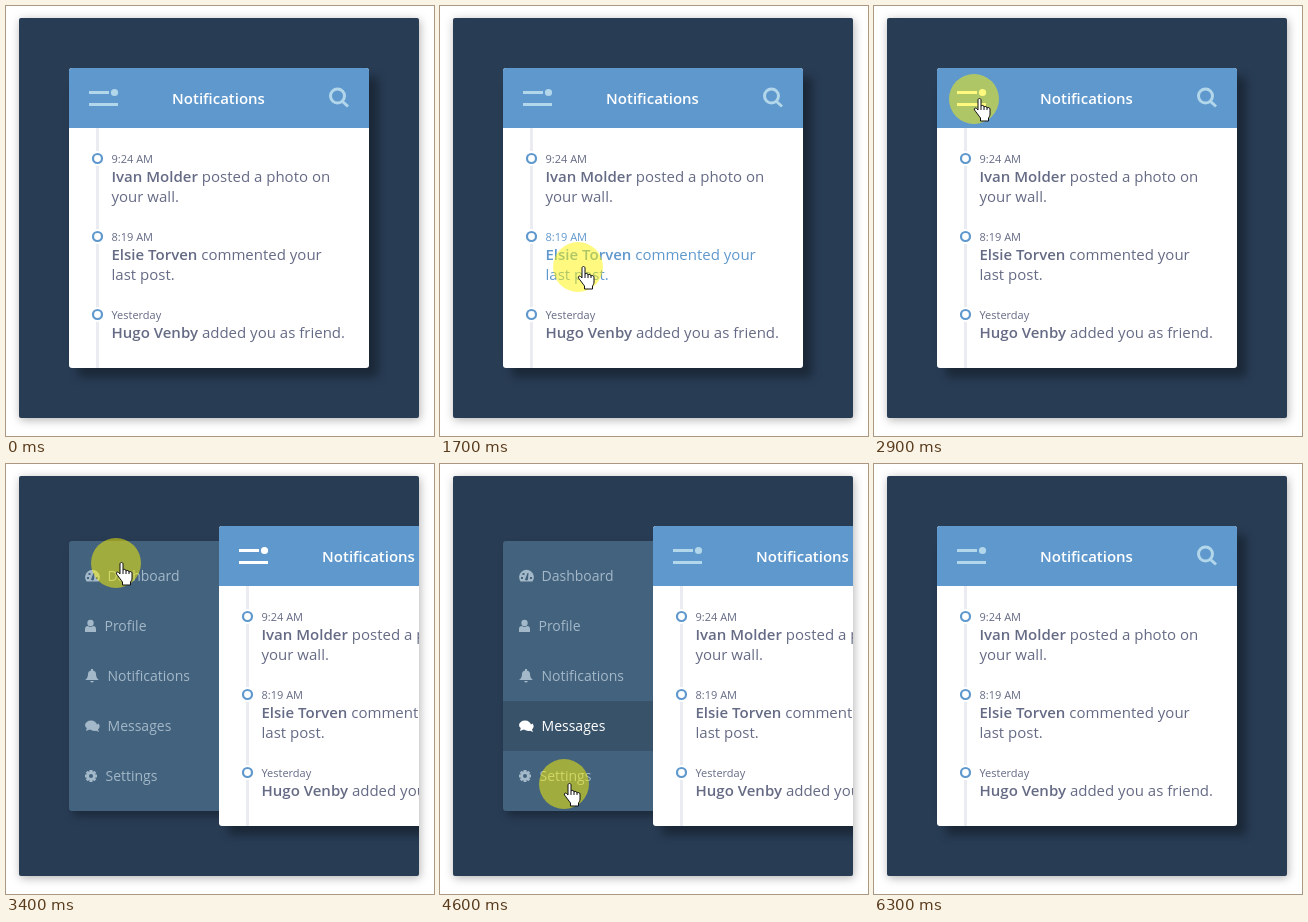
These frames come from a looping animation (428 px wide and 430 px high, 6.6 s). An HTML page:

```html
<!DOCTYPE html>
<html lang="en">
<head>
<meta charset="utf-8">
<title>Notifications</title>
<style>
  html, body { margin: 0; width: 100%; height: 100%; overflow: hidden; background: #fff; }
  svg { display: block; width: 428px; height: 430px; font: 15px "Open Sans", sans-serif; }
  .panel { fill: #283c54; filter: drop-shadow(1px 2px 5px rgba(0, 0, 0, .3)); }
  .sheet { fill: #fff; filter: drop-shadow(9px 9px 5px rgba(0, 0, 0, .35)); }
  .menu { fill: #43627d; filter: drop-shadow(4px 5px 4px rgba(0, 0, 0, .3)); }
  .header { fill: #5f98cd; }
  .title { fill: #fff; font-weight: 600; text-anchor: middle; }
  .toggle, .search { fill: none; stroke: #b2d6ea; stroke-width: 3; }
  .toggle circle { fill: #b2d6ea; stroke: none; }
  .toggle.hover { stroke: #fff; }
  .toggle.hover circle { fill: #fff; }
  .note { fill: #666b85; }
  .note.hover { fill: #5f98cd; }
  .time { font-size: 11px; }
  .name { font-weight: 600; }
  .ring { fill: #fff; stroke: #5f98cd; stroke-width: 2.2; }
  .item { fill: #a3b8c9; font-size: 14px; }
  .item rect { fill: none; }
  .item.hover { fill: #fff; }
  .item.hover rect { fill: #385269; }
  .item .gap { fill: #43627d; }
  .item.hover .gap { fill: #385269; }
  .item .tooth { fill: inherit; }
</style>
</head>
<body>
<svg viewBox="0 0 428 430">
  <clipPath id="stage"><rect x="13" y="12" width="400" height="400" rx="2"/></clipPath>
  <rect class="panel" x="13" y="12" width="400" height="400" rx="2"/>
  <g clip-path="url(#stage)">
    <rect class="menu" x="63" y="77" width="156" height="270" rx="3"/>
    <g id="items"></g>
    <g id="card">
      <rect class="sheet" x="63" y="62" width="300" height="300" rx="3"/>
      <path class="header" d="M63 122V65q0-3 3-3h294q3 0 3 3v57z"/>
      <g class="toggle" id="toggle">
        <path d="M83 86.500h20M83 98.500h29"/>
        <circle cx="108.500" cy="86.500" r="3.600"/>
      </g>
      <text class="title" x="212.500" y="98">Notifications</text>
      <path class="search" d="M336 95l6 5.500M338.500 90a7 7 0 1 1-14 0a7 7 0 1 1 14 0"/>
      <path d="M90 122h3v240h-3z" fill="#ebebf2"/>
      <g id="notes"></g>
    </g>
  </g>
  <g id="cursor">
    <circle r="25" fill="rgba(255,245,0,.5)"/>
    <g transform="translate(0 -1)" stroke="#111" stroke-linejoin="round">
      <path fill="#fff" d="M4 2c0-2 3-2 3 0v6c1-1 3-1 3 1c1-1 3-.7 3 1c1-.8 3-.5 3 1v5c0 2-1 3-1.500 4v3h-8v-3C5 18 2 14 .5 12c-1-1.500 1-2.500 2-1.500L4 12z"/>
      <path fill="none" d="M7 8v4M10 9v3M13 10v2"/>
    </g>
  </g>
</svg>
<script>
const $ = id => document.getElementById(id);

const notes = [
  ['9:24 AM', 'Ivan Molder', 'posted a photo on', 'your wall.'],
  ['8:19 AM', 'Elsie Torven', 'commented your', 'last post.'],
  ['Yesterday', 'Hugo Venby', 'added you as friend.', '']
];
$('notes').innerHTML = notes.map(([time, name, text, more], i) => `
  <g class="note" id="note${i}" transform="translate(0 ${i * 78})">
    <circle cx="91.500" cy="152.500" r="7.500" fill="#fff"/>
    <circle class="ring" cx="91.500" cy="152.500" r="4.500"/>
    <text class="time" x="105.500" y="157">${time}</text>
    <text x="105.500" y="176"><tspan class="name">${name}</tspan> ${text}</text>
    <text x="105.500" y="196">${more}</text>
  </g>`).join('');

// Icons are drawn around the vertical centre of each row, from x = 0.
const gearTeeth = [0, 45, 90, 135].map(angle =>
  `<rect class="tooth" x="4.500" y="-6" width="3" height="12" transform="rotate(${angle} 6 0)"/>`).join('');
const items = [
  ['Dashboard', 101.5, `<path d="M1.500 5.500a7.400 7.400 0 1 1 12 0z"/>
    <path class="gap" d="M6 3.500a1.700 1.700 0 0 0 3 0L9.500-3 8.500-3zM2 1h2v2H2zM3.500-3h2v2h-2zM11 1h2v2h-2z"/>`],
  ['Profile', 98.5, '<circle cx="5.500" cy="-3" r="3.200"/><path d="M0 6V3Q0 0 3 0q2.500 1.800 5 0q3 0 3 3v3z"/>'],
  ['Notifications', 101.5, '<path d="M0 4q3-2 3-6 0-3 3-3.500v-1.500h2v1.500q3 .5 3 3.500 0 4 3 6zM5 5h4q-2 3-4 0z"/>'],
  ['Messages', 101.5, `<path d="M5 3.500q3 2 6 1.200l3 1.300-1-2.500q3-3 .5-6z"/>
    <ellipse cx="6" cy="-1" rx="6" ry="4.400"/><path d="M2 1L1 5l5-2z"/>`],
  ['Settings', 99.5, `<circle cx="6" r="4.700"/>${gearTeeth}<circle class="gap" cx="6" r="2"/>`]
];
$('items').innerHTML = items.map(([label, x, icon], i) => `
  <g class="item" id="item${i}" transform="translate(0 ${i * 50})">
    <rect x="63" y="87" width="152" height="50"/>
    <g transform="translate(79 112)">${icon}</g>
    <text x="${x}" y="117">${label}</text>
  </g>`).join('');

// Pointer stops: time, x, y.
const path = [
  [100, 10, 125], [800, 112, 158], [1400, 134, 234], [1700, 138, 261], [2150, 125, 328],
  [2300, 125, 325], [2800, 100, 93], [3200, 100, 93], [3400, 110, 99], [3600, 115, 118],
  [4600, 124, 320], [4800, 124, 322], [5250, 241, 92], [5500, 241, 92], [6000, 402, 68]
];
// Element under the pointer from each time on.
const hovers = [
  [0, ''], [700, 'note0'], [1450, 'note1'], [1950, 'note2'], [2400, 'note1'], [2550, 'note0'],
  [2700, 'toggle'], [3450, 'item0'], [3750, 'item1'], [4000, 'item2'], [4250, 'item3'],
  [4650, 'item4'], [4950, 'item3'], [5050, 'item2'], [5150, 'toggle'], [5650, '']
];

const clamp = v => Math.max(0, Math.min(1, v));
const ease = u => u < .5 ? 4 * u ** 3 : 1 - 4 * (1 - u) ** 3;
const slide = (t, start) => ease(clamp((t - start) / 230));

function pointerAt(t) {
  const i = Math.max(1, path.findIndex(p => p[0] >= t));
  const [a, b] = [path[i - 1], path[i]];
  const u = clamp((t - a[0]) / (b[0] - a[0]));
  return [a[1] + (b[1] - a[1]) * u, a[2] + (b[2] - a[2]) * u];
}

let hovered = '';
function render(now) {
  const clock = now % 6600;
  const visible = clock >= 100 && clock < 6300;
  const t = Math.min(6000, Math.floor(clock / 100) * 100);

  $('card').setAttribute('transform', `translate(${150 * (slide(t, 2969) - slide(t, 5369))} 0)`);
  $('cursor').setAttribute('visibility', visible ? 'visible' : 'hidden');
  $('cursor').setAttribute('transform', `translate(${pointerAt(t)})`);

  const target = hovers.filter(h => h[0] <= t).pop()[1];
  if (target !== hovered) {
    $(hovered)?.classList.remove('hover');
    $(target)?.classList.add('hover');
    hovered = target;
  }
}

const start = performance.now();
(function frame() {
  render(performance.now() - start);
  requestAnimationFrame(frame);
})();
</script>
</body>
</html>
```
